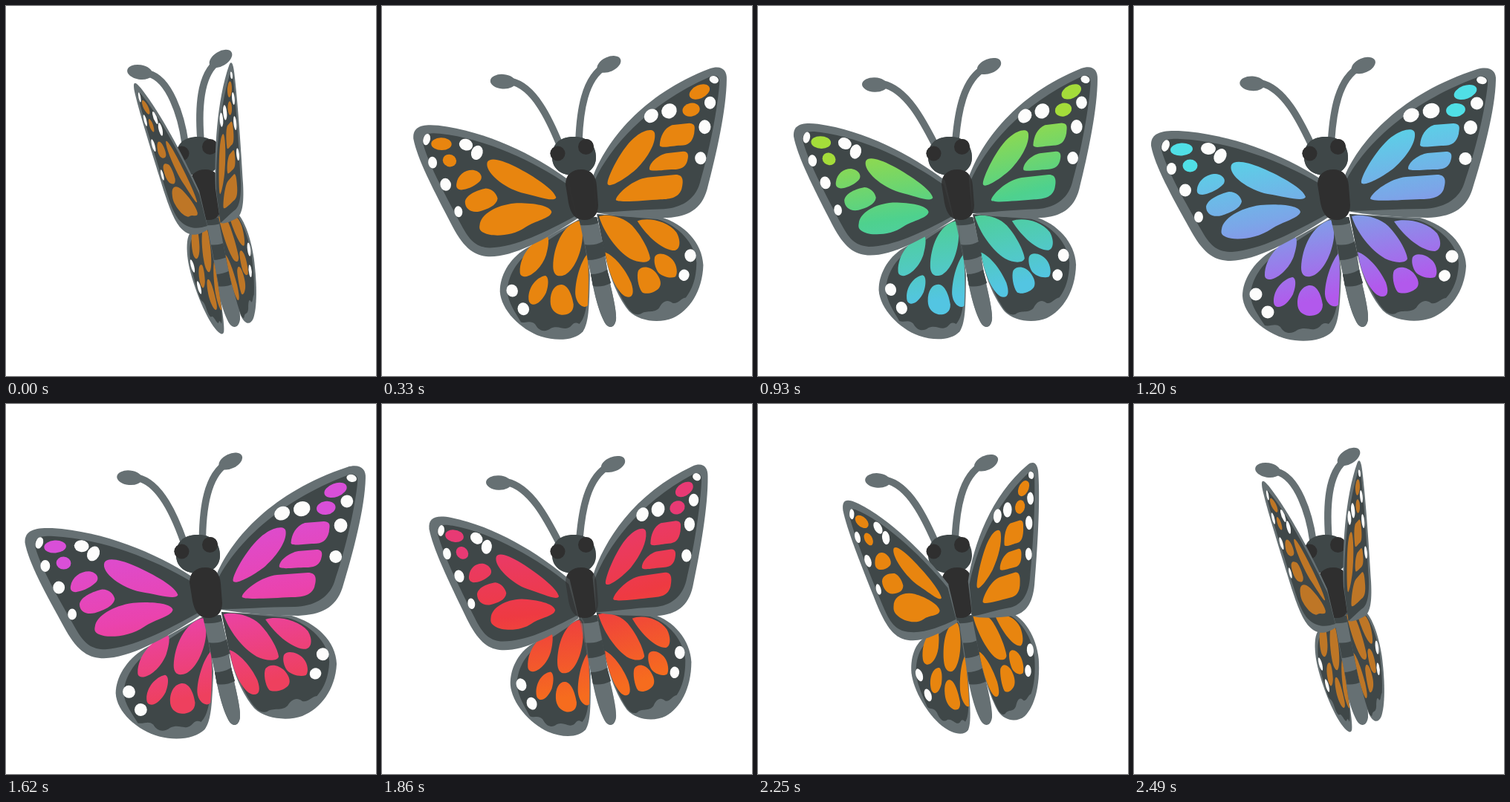
Animation of 498 by 498 pixels, one loop 2520 ms. Source, as an HTML page:

```html
<!DOCTYPE html>
<html lang="en">
<head>
<meta charset="utf-8">
<title>Butterfly</title>
<style>
html, body { margin: 0; width: 100%; height: 100%; overflow: hidden; background: #fff; }
svg { display: block; width: 100vw; height: 100vh; }
.rim { fill: #667073; }
.dark { fill: #3f4748; }
.black { fill: #2f2f2f; }
.cell { fill: url(#tint); }
.dot { fill: #fdfdfc; }
.stem { fill: none; stroke: #667073; stroke-width: 9.5; stroke-linecap: round; }
</style>
</head>
<body>
<svg viewBox="0 0 498 498" xmlns="http://www.w3.org/2000/svg">
  <defs>
    <linearGradient id="tint" gradientUnits="userSpaceOnUse" x1="250" y1="155" x2="296" y2="386">
      <stop offset="0"/><stop offset=".5"/><stop offset="1"/>
    </linearGradient>
  </defs>
  <g id="antennae">
    <path class="stem"/><ellipse class="rim" rx="17" ry="9.8"/>
    <path class="stem"/><ellipse class="rim" rx="17" ry="9.8"/>
  </g>
  <g id="body">
    <path class="rim" d="M265 286L289 284C296 310 300 335 305 365C311 390 316 412 315 422C313 434 306 434 301 428C293 415 286 390 282 365Z"/>
    <path class="dark" d="M265 286L289 284L291 292Q280 296 267 295ZM273 321Q286 323 297 317L301 336Q290 342 277 342ZM281 361Q293 361 303 355L308 373Q296 379 284 377Z"/>
    <path class="dark" d="M229 205C228 185 240 176 258 176C277 176 288 186 288 205C287 222 272 228 259 228C242 228 230 220 229 205Z"/>
    <circle class="black" cx="236.500" cy="198.500" r="10"/>
    <circle class="black" cx="274.500" cy="189.500" r="10.500"/>
    <path class="black" d="M247 240C247 227 256 220 268 220C281 220 288 228 289 242L291 268C291 281 283 288 273 288C260 288 254 280 251 265Z"/>
  </g>
  <g id="wings"></g>
  <use id="front" href="#body"/>
</svg>
<script>
const LOOP = 2520, STEP = 30;
const $ = s => document.querySelector(s);

// Wings are drawn spread; "fold" is the matrix that closes them.
// spots: [x, y, rx, ry, angle]
const wings = [
  {
    fold: [.336, .412, .151, .933, 137.3, -79.6],
    rim: 'M268 284L185 330C160 345 146 370 146 390C147 415 175 440 205 448C230 454 255 450 267 438C276 425 277 405 279 360L272 290Z',
    dark: 'M266 286L195 332C172 345 157 370 157 390C158 405 168 417 176 430C184 432 190 426 197 432C203 442 212 442 220 436C232 431 238 438 246 434C252 432 252 424 262 428C272 418 275 400 277 360L270 290Z',
    cells: 'M176 362C176 340 195 318 216 311C221 312 219 325 215 337C209 353 195 366 184 368C178 368 176 366 176 362Z' +
      'M225 352C226 325 240 295 264 288C270 288 270 300 269 312C266 335 255 355 243 362C232 367 225 364 225 352Z' +
      'M188 397C188 382 200 368 213 365C219 366 218 378 214 388C208 399 200 406 193 405C189 404 188 401 188 397Z' +
      'M220 400C220 385 228 376 237 376C246 376 252 388 254 402C254 413 245 417 236 417C226 416 220 410 220 400Z' +
      'M257 388C257 370 265 345 275 333C278 345 277 380 275 402C270 408 258 402 257 388Z',
    tips: [],
    dots: [[164, 388, 8.5, 8.5, 0], [180, 412, 8.5, 8.5, 0]]
  },
  {
    fold: [.241, -.109, .154, 1.075, 172, 12],
    rim: 'M290 280L385 285C420 295 446 320 447 350C445 385 425 410 400 420C380 427 350 424 335 410C322 395 308 370 301 335Z',
    dark: 'M290 280L380 288C412 297 436 322 437 347C436 368 430 382 420 393C412 394 408 402 400 400C392 394 385 398 380 406C372 414 360 408 352 414C340 418 332 404 326 395C315 375 306 355 301 335Z',
    cells: 'M350 290C365 285 395 290 408 306C414 316 414 328 405 330C388 330 365 312 350 290Z' +
      'M293 283C305 279 330 284 342 296C356 310 367 330 368 340C366 347 350 346 338 340C318 328 300 305 293 283Z' +
      'M375 338C379 331 394 334 402 343C408 350 409 361 405 365C397 368 384 364 379 358C375 352 373 344 375 338Z' +
      'M350 356C356 349 368 351 376 359C383 367 385 375 380 380C372 387 360 388 355 385C349 378 347 362 350 356Z' +
      'M301 331C313 335 330 352 339 372C343 384 342 391 334 391C322 391 306 365 301 331Z',
    tips: [],
    dots: [[428, 337, 8.5, 8.5, 0], [418, 363, 8, 7.5, -30]]
  },
  {
    fold: [.354, .417, .154, .8965, 135.8, -63.4],
    rim: 'M250 232C200 200 130 172 60 168C35 167 22 172 23 188C28 215 50 255 78 305C95 335 110 343 130 343C165 342 210 318 262 284Z',
    dark: 'M248 238C200 210 130 182 62 179C42 178 35 182 37 194C46 225 68 262 92 304C104 325 114 331 132 331C170 328 215 305 260 280Z',
    cells: 'M131 214C135 207 150 209 172 218C200 230 228 246 231 257C228 264 205 257 180 253C155 248 126 228 131 214Z' +
      'M118 300C120 286 142 272 170 268C195 266 222 268 224 277C222 286 200 290 185 300C165 314 135 316 124 311C117 308 117 305 118 300Z' +
      'M85 246C87 234 98 226 110 226C121 227 126 236 118 242C110 249 100 253 92 254C86 254 84 251 85 246Z' +
      'M97 270C99 260 115 253 128 250C138 250 144 257 145 263C143 273 130 278 118 282C106 285 97 280 97 270Z',
    tips: [[64, 193, 15, 8.5, -4], [75.5, 215, 10, 8.5, 0]],
    dots: [[42.5, 188, 5, 8, 20], [50.5, 219, 6.5, 8, 0], [69, 248, 8, 8.5, 0],
      [87, 284, 6, 7.5, 0], [100, 192, 10, 8, 5], [116, 202, 8, 10.5, 30]]
  },
  {
    fold: [.203, -.147, .1235, .979, 196.1, 64.1],
    rim: 'M284 228C305 180 360 118 462 85C480 80 488 88 487 100C486 140 470 200 455 248C446 275 425 284 395 285C350 284 310 281 288 276Z',
    dark: 'M287 232C310 190 365 132 462 96C474 92 477 98 476 106C472 145 458 200 444 240C436 262 415 272 390 273C350 273 315 276 288 276Z',
    cells: 'M306 238C304 230 330 186 350 174C363 165 378 163 378 172C379 184 368 202 350 218C335 230 309 244 306 238Z' +
      'M385 187C386 175 392 164 404 160L430 158C440 159 438 164 437 172C434 184 428 188 416 188C405 188 386 192 385 187Z' +
      'M369 219C369 210 383 200 395 198L420 196C429 196 428 203 426 209C423 218 415 220 405 220C392 220 370 223 369 219Z' +
      'M318 259C321 250 345 232 366 230L408 227C420 227 420 236 417 246C413 258 400 260 385 260C360 261 318 264 318 259Z',
    tips: [[446, 116, 16, 9, -20], [433, 140, 13, 9, -8]],
    dots: [[468, 100, 7, 5, 15], [461.5, 131, 8.5, 8.5, 0], [453, 163.5, 9, 9.5, 0],
      [446, 205.5, 8.5, 8.5, 0], [400, 141, 11.5, 10, -15], [373, 147, 11, 9, -25]]
  }
];

const spot = kind => ([x, y, rx, ry, r]) =>
  `<ellipse class="${kind}" rx="${rx}" ry="${ry}" transform="translate(${x} ${y}) rotate(${r})"/>`;
const layer = (kind, d) => `<path class="${kind}" d="${d}"/>`;

$('#wings').innerHTML = wings.map(w => '<g>' +
  layer('rim', w.rim) + layer('dark', w.dark) + layer('cell', w.cells) +
  w.tips.map(spot('cell')).join('') + w.dots.map(spot('dot')).join('') + '</g>').join('');

// Each antenna: stem curve (8 numbers), then club x, y, angle.
const antennae = [
  { rest: [238, 186, 222, 155, 200, 112, 168, 105, 157, 106, 3],
    up: [241, 184, 236, 148, 220, 98, 192, 91, 180, 89, 9] },
  { rest: [266, 180, 269, 145, 276, 98, 306, 83, 311, 81, -22],
    up: [262, 180, 259, 140, 260, 92, 286, 74, 289, 71, -32] }
];

// [time, value]
const spread = [[0, 0], [430, 1.01], [520, 1.005], [630, .92], [830, .76], [1110, 1.01], [1200, 1],
  [1400, .55], [1590, .99], [1620, .983], [1860, .73], [2160, .553], [2250, .39], [2490, 0], [2520, 0]];
const lift = [[0, 1], [90, 1.5], [300, .35], [450, 0], [1100, 0], [1200, .1],
  [1500, .65], [1620, .4], [1800, 0], [2050, 0], [2250, .18], [2490, 1], [2520, 1]];

// [time, upper, middle, lower]
const orange = 0xe8850f, shade = 0xbe7626;
const hues = [
  [0, orange, orange, orange],
  [360, orange, orange, orange],
  [630, 0xf9ac12, 0xebc314, 0xdde612],
  [900, 0xb5dc25, 0x4fd27a, 0x48cfe0],
  [1050, 0x5fdc8c, 0x48cce0, 0x7f9fe8],
  [1200, 0x50dfe6, 0x7ba6e8, 0xb259ec],
  [1400, 0x7aa5e8, 0xa86aea, 0xe04fd0],
  [1620, 0xd94fd8, 0xea43ae, 0xee405e],
  [1860, 0xe83a74, 0xee3a42, 0xf66c1e],
  [2040, 0xee4030, 0xf4681c, 0xee7d12],
  [2200, orange, orange, orange],
  [2520, orange, orange, orange]
];

const lerp = (a, b, k) => a + (b - a) * k;
const clamp = v => Math.max(0, Math.min(1, v));
const rgb = n => [n >> 16, n >> 8 & 255, n & 255];
const mix = (a, b, k) => a.map((v, i) => lerp(v, b[i], k));
const segment = (keys, t) => Math.max(0, keys.findIndex(k => k[0] > t) - 1);

// Smooth curve through the keys without overshoot.
function curve(keys, t) {
  const slope = i => (keys[i + 1][1] - keys[i][1]) / (keys[i + 1][0] - keys[i][0]);
  const tangent = i => {
    if (i < 1 || i > keys.length - 2) return 0;
    const a = slope(i - 1), b = slope(i);
    return a * b > 0 ? 2 * a * b / (a + b) : 0;
  };
  const i = segment(keys, t), [t0, v0] = keys[i], [t1, v1] = keys[i + 1];
  const h = t1 - t0, k = (t - t0) / h, q = 1 - k;
  return v0 * (1 + 2 * k) * q * q + v1 * k * k * (3 - 2 * k) +
    h * k * q * (tangent(i) * q - tangent(i + 1) * k);
}

const wingEls = [...$('#wings').children];
const feelers = [...$('#antennae').children];
const stops = [...document.querySelectorAll('stop')];

function draw(t) {
  const open = curve(spread, t), raise = curve(lift, t);

  wings.forEach((w, i) => {
    const m = mix(w.fold, [1, 0, 0, 1, 0, 0], open);
    wingEls[i].setAttribute('transform', `matrix(${m})`);
  });
  $('#front').setAttribute('opacity', clamp((open - .55) / .33));

  antennae.forEach((a, i) => {
    const [x, y, ...rest] = mix(a.rest, a.up, raise);
    const [cx, cy, angle] = rest.slice(6);
    feelers[2 * i].setAttribute('d', `M${x} ${y}C${rest.slice(0, 6)}`);
    feelers[2 * i + 1].setAttribute('transform', `translate(${cx} ${cy}) rotate(${angle})`);
  });

  const n = segment(hues, t), from = hues[n], to = hues[n + 1];
  const k = (t - from[0]) / (to[0] - from[0]);
  stops.forEach((s, i) => {
    const c = mix(rgb(from[i + 1]), rgb(to[i + 1]), k);
    const lit = mix(rgb(shade), c, clamp(open / .35));
    s.setAttribute('stop-color', `rgb(${lit.map(Math.round)})`);
  });
}

const start = performance.now();
function tick() {
  const t = (performance.now() - start) % LOOP;
  draw(Math.floor(t / STEP) * STEP);
  requestAnimationFrame(tick);
}
tick();
</script>
</body>
</html>
```
